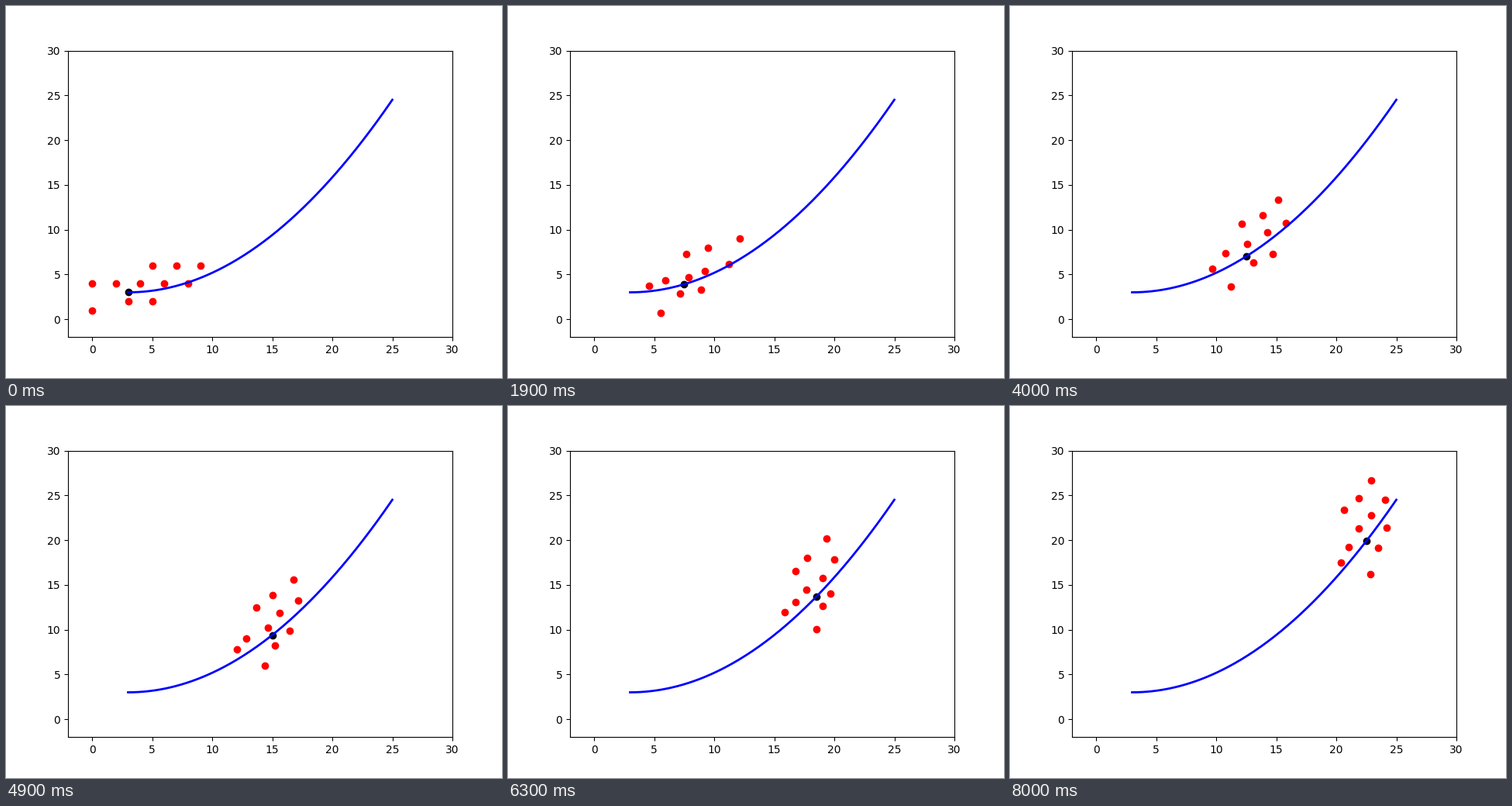
Animation of 640 by 480 pixels, one loop 8.1 s. Source, as a matplotlib script:

```python
import numpy as np
import matplotlib.pyplot as plt
from matplotlib.animation import FuncAnimation

FRAMES = 81
INTERVAL = 100
START_X, END_X = 3, 25
STRIDE = 0.5
BEND = 2 / 45
JITTER = 0.3

# Formation relative to the guide; the first three members are the leaders.
LEADERS = 3
FORMATION = np.array([
    (-3, 1), (6, 3), (-3, -2),
    (-1, 1), (1, 1), (3, 1), (5, 1),
    (2, 3), (4, 3), (0, -1), (2, -1),
])


def path(x):
    return START_X + BEND * (x - START_X) ** 2


def guide_at(step):
    x = START_X + STRIDE * step
    return np.array([x, path(x)])


def formation_at(step):
    """Formation turned to the heading of the path at a waypoint."""
    x, _ = guide_at(step)
    angle = np.arctan(2 * BEND * (x - START_X))
    c, s = np.cos(angle), np.sin(angle)
    return guide_at(step) + FORMATION @ np.array([[c, s], [-s, c]])


rng = np.random.default_rng(7)
poses = [formation_at(0)]
for step in range(FRAMES // 2):
    noise = rng.uniform(-JITTER, JITTER, FORMATION.shape)
    poses.append(formation_at(step) + noise)

fig, ax = plt.subplots(figsize=(6.4, 4.8), dpi=100)
ax.set_xlim(-2, 30)
ax.set_ylim(-2, 30)

curve_x = np.linspace(START_X, END_X, 200)
ax.plot(curve_x, path(curve_x), color="blue", lw=2)
members = ax.scatter(*poses[0].T, color="red")
guide = ax.scatter(*guide_at(0), color="black")


def update(frame):
    # Guide and leaders move on odd frames, followers catch up on even ones.
    lead, follow = (frame + 1) // 2, frame // 2
    guide.set_offsets(guide_at(max(lead - 1, 0)))
    members.set_offsets(np.vstack([poses[lead][:LEADERS],
                                   poses[follow][LEADERS:]]))
    return members, guide


anim = FuncAnimation(fig, update, frames=FRAMES, interval=INTERVAL,
                     repeat=True, repeat_delay=0)
plt.show()
```
